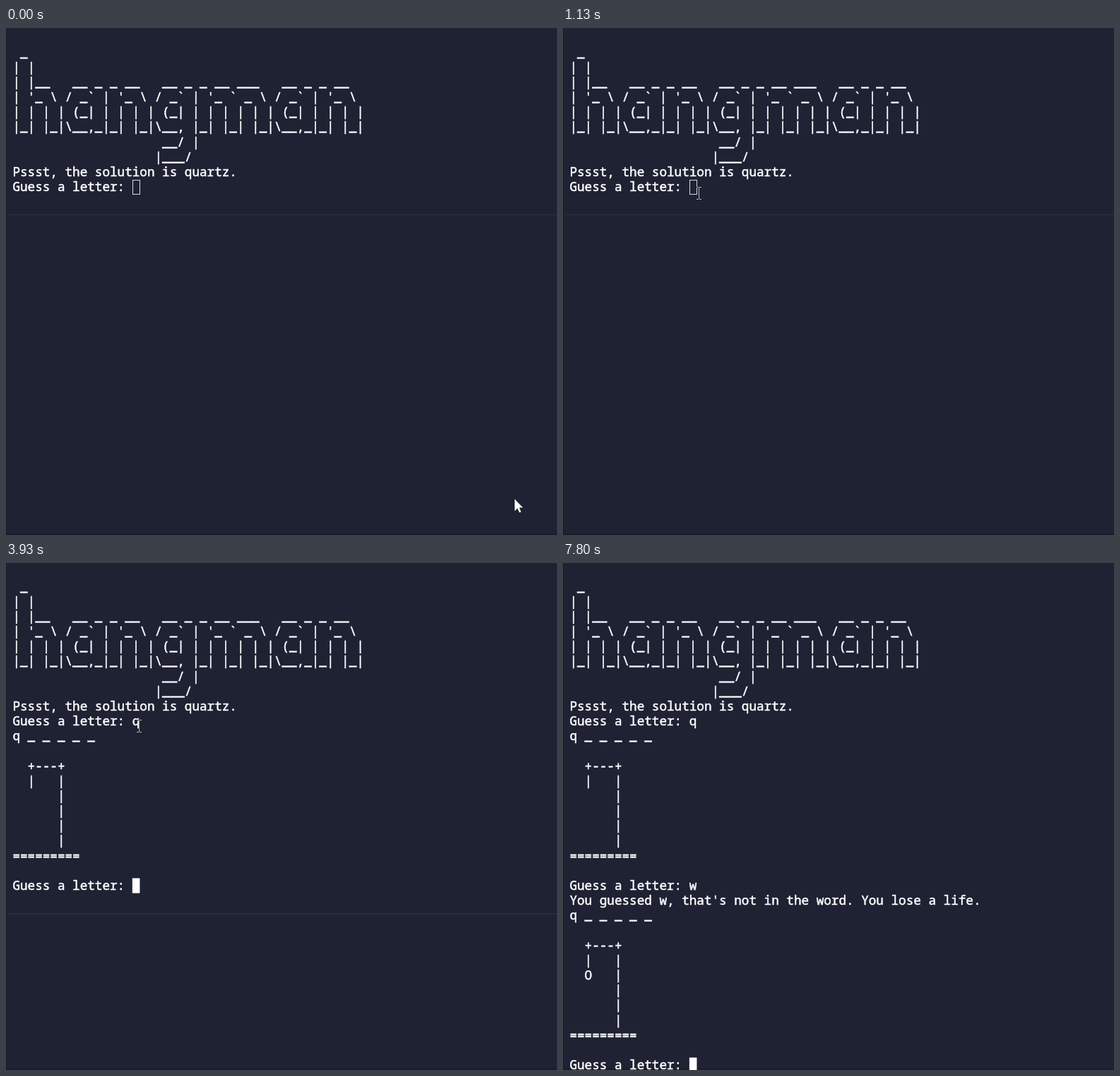
An HTML page with a canvas for the animation above (8 s loop, 780x718 px).

```html
<!DOCTYPE html>
<html lang="en">
<head>
<meta charset="utf-8">
<title>Hangman</title>
<style>
  html, body { margin: 0; width: 100%; height: 100%; overflow: hidden; background: #1f2233; }
  canvas { display: block; }
</style>
</head>
<body>
<canvas id="stage" width="780" height="718"></canvas>
<script>
const ctx = document.getElementById('stage').getContext('2d');
const LOOP = 8000, LEFT = 9.4, CHAR = 10.59, ROW = 21.17;

// "~" stands for a backtick
const banner = String.raw`
 _
| |
| |__   __ _ _ __   __ _ _ __ ___   __ _ _ __
| '_ \ / _~ | '_ \ / _~ | '_ ~ _ \ / _~ | '_ \
| | | | (_| | | | | (_| | | | | | | (_| | | | |
|_| |_|\__,_|_| |_|\__, |_| |_| |_|\__,_|_| |_|
                    __/ |
                   |___/
Pssst, the solution is quartz.`.replaceAll('~', '`');
const prompt = '\nGuess a letter: ';
const gallows = head => `
q _ _ _ _ _

  +---+
  |   |
  ${head}   |
${'      |\n'.repeat(3)}=========
`;

// Terminal output at each moment: [start, text]
const first = banner + prompt;
const second = first + 'q' + gallows(' ') + prompt;
const third = second + "w\nYou guessed w, that's not in the word. You lose a life."
  + gallows('O') + prompt;
const screens = [[0, first], [3870, first + 'q'], [3930, second], [6000, second + 'w'], [6070, third]];

// Pointer stops: [start, x, y, shape]
const pointer = [
  [0, 720, 667, arrow], [70, 560, 497, arrow], [130, 440, 393, arrow],
  [600, 402, 371, arrow], [670, 326, 328, arrow], [730, 262, 292, arrow],
  [800, 221, 269, arrow], [870, 202, 259, arrow], [930, 197, 248, beam],
  [1000, 194, 241, beam], [1070, 193, 236, beam], [1130, 192, 234, beam],
  [1270, 191, 233, beam], [1330, 189, 232, beam], [1400, 188, 231, beam],
  [7730, 0, 0, () => {}]
];

const at = (steps, t) => steps.findLast(step => step[0] <= t);

function rect(color, x, y, w, h) {
  ctx.fillStyle = color;
  ctx.fillRect(x, y, w, h);
}

function arrow(x, y) {
  const points = [[0, 0], [0, 17], [4, 13.3], [6.7, 19.3], [9.2, 18.2], [6.6, 12.3], [11.8, 12.3]];
  ctx.beginPath();
  for (const [px, py] of points) ctx.lineTo(x + px, y + py);
  ctx.closePath();
  ctx.lineWidth = 1;
  ctx.strokeStyle = '#11131d';
  ctx.stroke();
  ctx.fillStyle = '#fff';
  ctx.fill();
}

function beam(x, y) {
  ctx.globalCompositeOperation = 'difference';
  rect('#ddd', x, y - 8, 1, 16);
  for (const end of [y - 9, y + 8]) {
    rect('#ddd', x - 3, end, 3, 1);
    rect('#ddd', x + 1, end, 3, 1);
  }
  ctx.globalCompositeOperation = 'source-over';
}

// A thin outline gives the text its medium weight
function write(lines, top) {
  ctx.font = "17.65px 'Noto Sans Mono', monospace";
  ctx.fillStyle = ctx.strokeStyle = '#fff';
  ctx.lineWidth = 0.5;
  lines.forEach((line, i) => {
    const y = Math.round(top + i * ROW);
    ctx.fillText(line, LEFT, y);
    ctx.strokeText(line, LEFT, y);
  });
}

function draw(t) {
  const lines = at(screens, t)[1].split('\n');
  const early = t < 3930, focused = t >= 1600;
  const top = early ? 19.4 : 18.4;

  rect('#1f2233', 0, 0, 780, 718);
  rect('#171926', 0, 0, 1, 718);
  rect('#191b29', 0, 716, 780, 2);
  if (early) rect('#2d3042', 1, 264, 779, 1);
  else if (t < 6070) rect('#2c2f41', 2, 496, 778, 1.5);

  write(lines, top);

  const x = LEFT + lines.at(-1).length * CHAR;
  const y = top + (lines.length - 1) * ROW - 16.6;
  if (focused) {
    rect('#fff', x, y, CHAR, ROW);
  } else {
    ctx.lineWidth = 1;
    ctx.strokeStyle = '#d8d9de';
    ctx.strokeRect(Math.round(x) + 0.5, Math.round(y) + 0.5, 10, 20);
  }

  const [, px, py, shape] = at(pointer, t);
  shape(px, py);
}

const start = performance.now();
function tick() {
  draw((performance.now() - start) % LOOP);
  requestAnimationFrame(tick);
}
tick();
</script>
</body>
</html>
```
